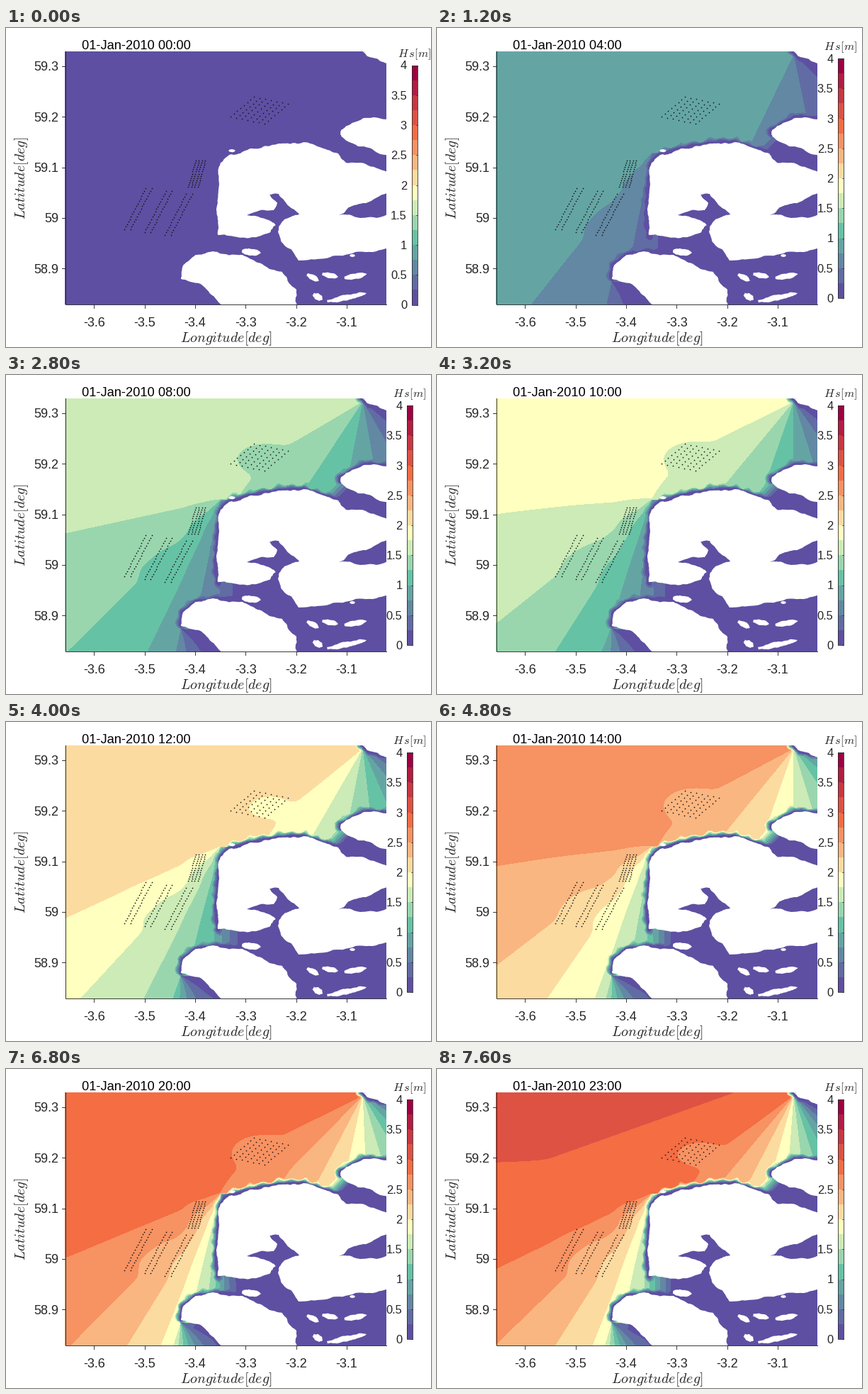
Write a matplotlib script that moves like this. It is 600 px wide and 450 px high and loops after 8000 ms.

```python
import numpy as np
import matplotlib.pyplot as plt
from matplotlib.animation import FuncAnimation
from matplotlib.colors import LinearSegmentedColormap, to_hex
from matplotlib.patches import Polygon, Rectangle
from matplotlib.transforms import Affine2D

plt.rcParams.update({"font.family": "Liberation Sans", "mathtext.fontset": "cm"})
INK = "#262626"
X0, X1, Y0, Y1 = 83.6, 537, 33.4, 390
rng = np.random.default_rng(4)

ramp_colors = LinearSegmentedColormap.from_list("waves", [
    (0, "#5e4fa2"), (4 / 15, "#66c2a5"), (7 / 15, "#ffffbf"),
    (11 / 15, "#f46d43"), (1, "#9e0142")])
PALETTE = [to_hex(ramp_colors(k / 15)) for k in range(16)]
LEVELS = np.arange(17) * 0.25

# Key points of the coasts in stage pixels; roughness is added by rule
NORTH_WEST = [(299, 292), (297, 257), (301, 220), (303, 190), (315, 179),
              (345, 170), (385, 163), (420, 161), (469, 177)]
MAINLAND = NORTH_WEST + [
    (480, 190), (500, 190), (560, 212), (560, 309), (484, 319), (413, 328),
    (388, 300), (386, 274), (372, 289), (338, 296)]
HOY_WEST = [(333, 320), (300, 317), (268, 320), (250, 335), (247, 354)]
HOY = HOY_WEST + [(272, 360), (312, 400), (415, 400), (410, 369), (390, 344),
                  (355, 331)]
ROUSAY_WEST = [(560, 130), (505, 127), (473, 144), (472, 150)]
ROUSAY = ROUSAY_WEST + [(497, 167), (560, 182)]
TOP_ISLE = [(503, 33), (513, 41), (560, 52), (560, 20)]
LAKE = [(372, 235), (385, 234), (414, 263), (393, 270), (384, 281), (371, 271),
        (340, 264), (378, 257), (383, 247)]
EAST_BAY = [(560, 225), (500, 248), (470, 264), (500, 268), (560, 257)]
# Islets as centre, half-axes and tilt in degrees
ISLETS = [(319, 173, 5, 2, 0), (346, 316, 14, 5, 5), (433, 352, 10, 4, 30),
          (457, 349, 12, 4, 10), (440, 379, 8, 5, 30), (493, 350, 17, 4, -10),
          (480, 380, 30, 4, -12), (489, 321, 4, 2, 0)]

# Sea state: hour, offshore height, western loss, its start angle, northern loss
SEA_STATE = np.array([
    (0, 0.00, .39, -20, .55),
    (1, 0.20, .39, -20, .55),
    (4, 0.99, .39, -20, .55),
    (6, 1.36, .42, -20, .60),
    (10, 1.81, .42, -20, .60),
    (14, 2.58, .32, -20, .43),
    (18, 2.71, .77, 20, .41),
    (23, 3.01, .34, -20, .60)])
# Wakes behind the turbine arrays: centre, spread, relative loss
WAKES = [(360, 116, 38, 22, .07), (210, 262, 38, 28, .035), (270, 206, 18, 18, .03)]


def rough(points, passes=4):
    """Close the outline and displace midpoints at random."""
    p = np.array(points, float)
    for _ in range(passes):
        edge = np.roll(p, -1, axis=0) - p
        bend = rng.normal(0, 0.05, (len(p), 1))
        middle = p + edge / 2 + bend * edge[:, ::-1] * [1, -1]
        p = np.stack((p, middle), axis=1).reshape(-1, 2)
    return p


def islet(cx, cy, rx, ry, tilt):
    t = np.arange(7) * 2 * np.pi / 7
    shape = np.c_[rx * np.cos(t), ry * np.sin(t)]
    return rough(Affine2D().rotate_deg(tilt).translate(cx, cy).transform(shape))


def ramp(value, start, end):
    return np.clip((value - start) / (end - start), 0, 1)


GX, GY = np.meshgrid(np.linspace(X0, X1, 302), np.linspace(Y0, Y1, 238))


def angle_at(x, y, turn):
    """Bearing in degrees seen from a headland; 0 is south, west is positive."""
    return turn + np.degrees(np.arctan2(x - GX, GY - y))


def coast_factor(coast):
    gap = np.full(GX.shape, np.inf)
    for a, b in zip(np.array(coast[:-1], float), np.array(coast[1:], float)):
        edge = b - a
        t = np.clip(((GX - a[0]) * edge[0] + (GY - a[1]) * edge[1]) / (edge @ edge), 0, 1)
        gap = np.minimum(gap, np.hypot(GX - a[0] - t * edge[0], GY - a[1] - t * edge[1]))
    bumps = 1 + .3 * np.sin(GX / 3.1 + GY / 7) + .25 * np.sin(GY / 2.7 - GX / 9)
    return ramp(gap, 2, 2 + 6 * bumps)


west_angle = np.degrees(np.arctan2(GY - 175, 303 - GX))
north_turn = ramp(angle_at(503, 37, 0), 70, -20) + ramp(angle_at(503, 37, 0), -20, -110)
north_part = north_turn ** 1.2 * ramp(GX, 250, 400)
offshore = 1 - 1e-4 * np.minimum(.335 * (GX - 84) + .94 * (GY - 117), 100)

shelter = np.minimum.reduce([coast_factor(c) for c in (
    NORTH_WEST, HOY_WEST, ROUSAY_WEST, TOP_ISLE[:3])])
shelter *= 1 - .85 * ramp(-angle_at(246, 358, 0), -25, 65) * (GY > 358)
shelter *= 1 - ramp(GX, 292, 338) * (GY > 185)
shelter *= 1 - ramp(GX + GY, 618, 648) * (GY > 145) * (GX > 440)
for cx, cy, sx, sy, loss in WAKES:
    spread = ((GX - cx) / sx) ** 2 + ((GY - cy) / sy) ** 2
    shelter *= 1 - loss * np.exp(-spread ** 2)


def height_at(hour):
    height, west, start, north = (
        np.interp(hour, SEA_STATE[:, 0], column) for column in SEA_STATE[:, 1:].T)
    turn = np.clip((west_angle - start) / 90, 0, 1.15)
    sea_height = height * offshore * (1 - west * turn ** 2.2) * (1 - north * north_part)
    return np.clip(sea_height * shelter, 0.01, 3.99)


fig = plt.figure(figsize=(600 / 72, 450 / 72), dpi=72, facecolor="white")
ax = fig.add_axes([0, 0, 1, 1])
ax.set(xlim=(0, 600), ylim=(450, 0))
ax.axis("off")
frame_box = Rectangle((X0, Y0), X1 - X0, Y1 - Y0, fc="none", ec="none")
ax.add_patch(frame_box)


def add_shape(points, color, z):
    shape = Polygon(points, fc=color, ec="none", zorder=z)
    ax.add_patch(shape)
    shape.set_clip_path(frame_box)


for land in (MAINLAND, HOY, ROUSAY, TOP_ISLE):
    add_shape(rough(land), "white", 3)
for spec in ISLETS:
    add_shape(islet(*spec), "white", 3)
for water in (LAKE, EAST_BAY):
    add_shape(rough(water), PALETTE[0], 4)

# Turbine arrays: one lozenge, four short rows, three pairs of long rows
u, v = np.meshgrid(np.linspace(0, 1, 7), np.linspace(0, 1, 8))
dots = [np.c_[(317 + 48 * u + 33 * v).ravel(), (125 + 10 * u - 28 * v).ravel()]]
for k in range(4):
    dots.append(np.linspace((268 + 4.4 * k, 187), (257 + 4.7 * k, 224), 13))
for pair in range(3):
    for side in (0, 8.5):
        top = np.array((197 + 28.5 * pair + side, 226 + 4 * pair))
        dots.append(np.linspace(top, top + (-30, 58), 17))
ax.plot(*np.vstack(dots).T, "o", ms=1.7, mew=0, color="#151515", zorder=5)

# Axes
ax.plot([X0, X0, X1], [Y0, Y1, Y1], color=INK, lw=0.9, zorder=6)
for k in range(6):
    x = 124.3 + 71.3 * k
    ax.plot([x, x], [Y1, Y1 + 4.5], color=INK, lw=0.9)
    ax.text(x, 420.7, f"-{3.6 - k / 10:.1f}", size=18, color=INK, ha="center")
for k in range(5):
    y = 54 + 71.3 * k
    ax.plot([X0 - 4.5, X0], [y, y], color=INK, lw=0.9)
    ax.text(74, y + 6.5, f"{59.3 - k / 10:.3g}", size=18, color=INK, ha="right")
ax.text(310.5, 443, "$Longitude[deg]$", size=20, color=INK, ha="center")
ax.text(34.5, 212, "$Latitude[deg]$", size=20, color=INK, rotation=90,
        ha="right", va="center")
title = ax.text(107, 30, "", size=18.2, color="black")

# Colour bar, placed through a movable transform
shift = Affine2D()
bar = shift + ax.transData
BX, BW, BT, BH = 572.5, 8, 52.5, 338
for k, color in enumerate(PALETTE):
    ax.add_patch(Rectangle((BX, BT + BH * (15 - k) / 16), BW, BH / 16, fc=color,
                           ec="none", antialiased=False, transform=bar, zorder=7))
ax.add_patch(Rectangle((BX, BT), BW, BH, fc="none", ec=INK, lw=0.8,
                       transform=bar, zorder=8))
for k in range(9):
    y = BT + BH * (1 - k / 8)
    ax.plot([BX + BW - 2, BX + BW], [y, y], color=INK, lw=0.7, transform=bar, zorder=8)
    ax.text(566, y + 6, f"{k / 2:g}", size=16.5, color=INK, ha="right",
            transform=bar, zorder=8)
ax.text(576, 41, r"$H\,s[m]$", size=16.3, color=INK, ha="center", transform=bar)

sea = None


def update(i):
    global sea
    hour = round(1.2 * i)
    if sea is not None:
        sea.remove()
    sea = ax.contourf(GX, GY, height_at(hour), levels=LEVELS, colors=PALETTE, zorder=1)
    title.set_text(f"01-Jan-2010 {hour:02d}:00")
    shift.clear()
    if i > 0:
        shift.translate(-6.5, -9.5)
    return []


anim = FuncAnimation(fig, update, frames=20, interval=400, init_func=lambda: [],
                     repeat=True, repeat_delay=0, blit=False)
plt.show()
```
